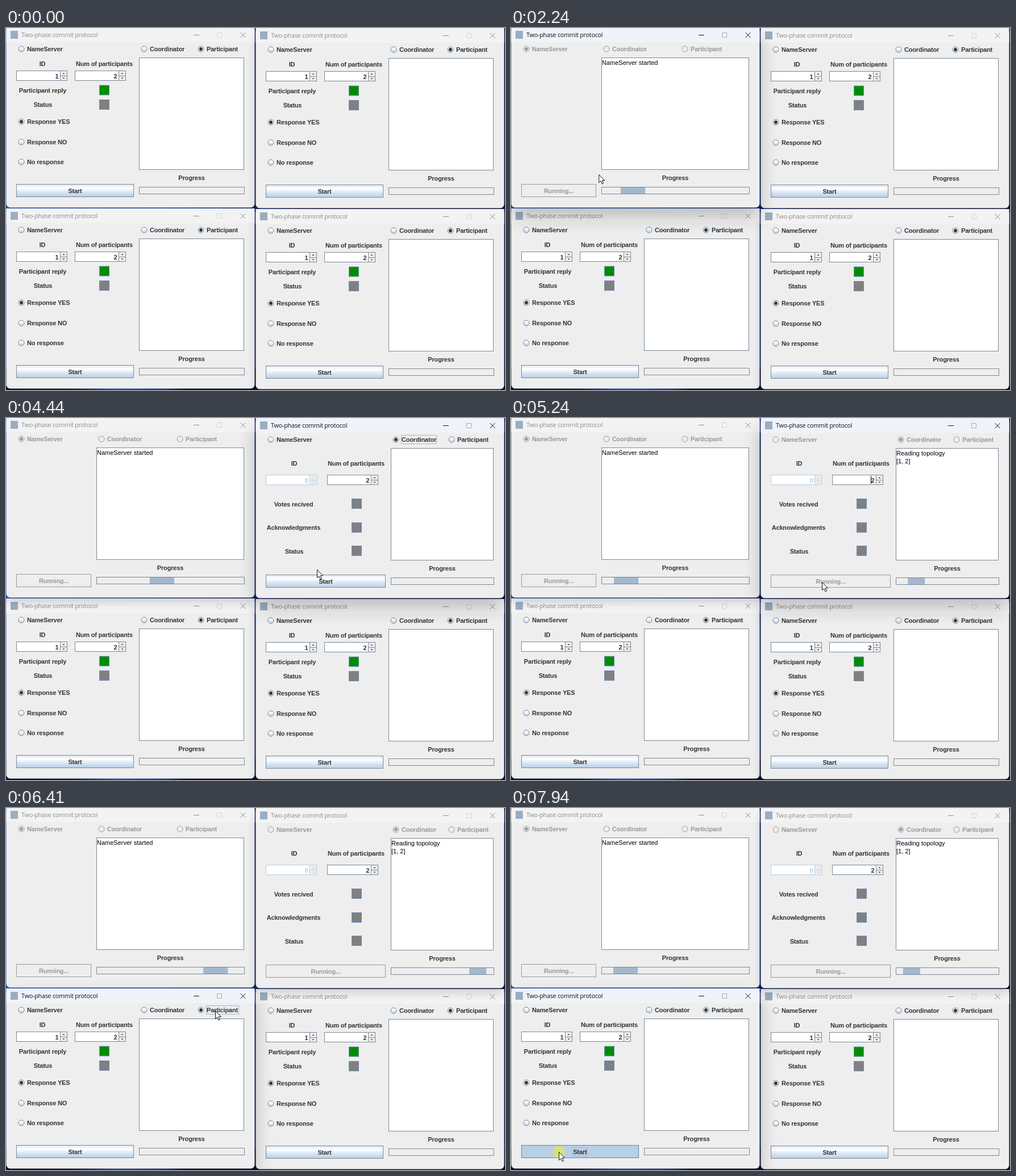
An HTML page for the animation above (8000 ms loop, 878x638 px).

```html
<!DOCTYPE html>
<html lang="en">
<head>
<meta charset="utf-8">
<title>Two-phase commit protocol</title>
<style>
html, body { margin: 0; width: 100%; height: 100%; overflow: hidden; background: #0a1336; }
svg { display: block; width: 878px; height: 638px; }
text { white-space: pre; }
.b { font: bold 11px "Liberation Sans", Arial, sans-serif; letter-spacing: -.17px; }
.p { font: 11px "Liberation Sans", Arial, sans-serif; }
.t { font: 10.8px "Open Sans", "Noto Sans", sans-serif; letter-spacing: -.25px; }
</style>
</head>
<body>
<svg viewBox="0 0 878 638" xmlns="http://www.w3.org/2000/svg">
  <defs>
    <linearGradient id="desk">
      <stop offset="0" stop-color="#1f55b8"/><stop offset=".3" stop-color="#1c3f9c"/>
      <stop offset=".5" stop-color="#10256c"/><stop offset=".62" stop-color="#0a1336"/>
      <stop offset="1" stop-color="#0b1640"/>
    </linearGradient>
    <linearGradient id="floor">
      <stop offset="0" stop-color="#0b1538"/><stop offset=".13" stop-color="#0c1c50"/>
      <stop offset=".22" stop-color="#2458c4"/><stop offset=".32" stop-color="#1a3c94"/>
      <stop offset=".36" stop-color="#0a1336"/><stop offset="1" stop-color="#0a1030"/>
    </linearGradient>
    <linearGradient id="ocean" x2="0" y2="1">
      <stop offset="0" stop-color="#dde8f3"/><stop offset=".3" stop-color="#fff"/>
      <stop offset=".6" stop-color="#dde8f3"/><stop offset="1" stop-color="#b8cfe5"/>
    </linearGradient>
    <filter id="near" x="-20%" y="-20%" width="140%" height="150%"><feGaussianBlur stdDeviation="8"/></filter>
    <filter id="far" x="-20%" y="-20%" width="140%" height="150%"><feGaussianBlur stdDeviation="16"/></filter>
  </defs>
  <rect width="878" height="638" fill="url(#desk)"/>
  <rect y="600" width="878" height="38" fill="url(#floor)"/>
  <g id="windows"></g>
  <rect id="bar1" y="281" height="11" fill="#a3b8cc"/>
  <rect id="bar2" y="282" height="11" fill="#a3b8cc"/>
  <circle id="halo" r="10.5" fill="#d9e36a" fill-opacity=".92"/>
  <path id="arrow" d="M.5 .5V14.6L3.8 11.6L6.1 16.9L8.4 15.9L6.1 10.8H10.4Z" fill="#fff" stroke="#111"/>
</svg>
<script>
const LOOP = 8000;
const INK = '#333', DIM = '#999', EDGE = '#7a8a99', PALE = '#b8cfe5', GREY = '#808080';
const $ = id => document.getElementById(id);
const set = (el, attrs) => { for (const k in attrs) el.setAttribute(k, attrs[k]); };

// Mouse stops: time, x, y
const path = [
  [40, 866, 640], [810, 83, 49], [950, 76, 34], [1200, 76, 34], [1630, 105, 278],
  [2080, 105, 278], [2990, 700, 36], [3580, 700, 36], [4340, 547, 267],
  [4440, 547, 267], [4700, 547, 289], [5250, 547, 289], [6050, 368, 354],
  [6130, 368, 357], [6480, 368, 357], [7720, 84, 606], [8000, 84, 606]
];
// Mouse button: down, up
const clicks = [[960, 1080], [1910, 2000], [3440, 3560], [4920, 5030], [6160, 6280], [7820, 8000]];
const [pickName, startName, pickCoord, startCoord, pickPart, startPart] = clicks;

// Unfolded travel of the first bouncing bar
const travel = [[2010, 0], [3320, 187], [4440, 339], [5240, 453], [6410, 619], [7940, 844], [8000, 853]];

function along(knots, t, ease = p => p) {
  if (t <= knots[0][0]) return knots[0].slice(1);
  const i = knots.findIndex(k => k[0] > t);
  if (i < 0) return knots[knots.length - 1].slice(1);
  const a = knots[i - 1], b = knots[i];
  const p = ease((t - a[0]) / (b[0] - a[0]));
  return a.slice(1).map((v, j) => v + (b[j + 1] - v) * p);
}
const smooth = p => p * p * (3 - 2 * p);
const bounce = (d, range) => range - Math.abs(d % (2 * range) - range);

const box = (x, y, w, h, fill, stroke = EDGE) =>
  `<rect x="${x + .5}" y="${y + .5}" width="${w - 1}" height="${h - 1}" fill="${fill}" stroke="${stroke}"/>`;
const line = (d, stroke) => `<path d="${d}" fill="none" stroke="${stroke}"/>`;
const text = (s, x, y, fill = INK, anchor = 'start', cls = 'b') =>
  `<text class="${cls}" x="${x}" y="${y}" fill="${fill}" text-anchor="${anchor}">${s}</text>`;
const label = (s, x, y) => text(s, x, y + 4, INK, 'middle');
const focusBox = (x, y, w) => box(x, y, w, 16, 'none', '#a3b8cc');
const lamp = (x, y, fill) => box(x, y, 18, 18, fill, '#6f8cb8');

function radio(s, x, y, { on = false, off = false, focus = 0 } = {}) {
  const ink = off ? DIM : INK;
  return `<circle cx="${x}" cy="${y}" r="5" fill="${off ? '#eee' : 'url(#ocean)'}" stroke="${off ? DIM : EDGE}"/>` +
    (on ? `<circle cx="${x}" cy="${y}" r="2.9" fill="${ink}"/>` : '') +
    (focus ? focusBox(x + 9, y - 8, focus) : '') + text(s, x + 10, y + 4, ink);
}

function spinner(value, x, y, off) {
  const edge = off ? PALE : EDGE, ink = off ? PALE : INK, bx = x + 77;
  return box(x, y, 90, 18, '#fff', edge) +
    box(bx, y, 13, 10, '#eee', edge) + box(bx, y + 9, 13, 9, '#eee', edge) +
    `<path d="M${bx + 4.5} ${y + 6}h4l-2 -2zM${bx + 4.5} ${y + 12.5}h4l-2 2z" fill="${ink}"/>` +
    text(value, x + 74.5, y + 14, ink, 'end');
}

function button(w, s) {
  const mid = 18 + w / 2;
  if (s.run) return box(18, 275, w, 23, '#eee', DIM) + text('Running...', mid, 291, DIM, 'middle');
  return box(18, 275, w, 23, s.press ? PALE : 'url(#ocean)', s.hover ? '#6382bf' : EDGE) +
    (s.hover && !s.press ? box(19, 276, w - 2, 21, 'none', PALE) : '') +
    (s.press ? focusBox(mid - 14, 279, 27) : '') + text('Start', mid, 291, INK, 'middle');
}

// Left edge of the log, radio places and button width of each role
const layouts = {
  name: { log: 159, coord: 168, part: 306, button: 132 },
  coord: { log: 238, coord: 247, part: 345, button: 211 },
  part: { log: 234, coord: 243, part: 343, button: 207 }
};

function fields(s) {
  if (s.role === 'name') return '';
  if (s.role === 'coord') return label('ID', 68, 79) + label('Num of participants', 177, 79) +
    spinner(0, 18, 99, true) + spinner(2, 126, 99) +
    (s.caret ? line('M194.5 101V115', '#000') : '') +
    label('Votes recived', 67, 151) + lamp(169, 141, GREY) +
    label('Acknowledgments', 67, 192) + lamp(169, 183, GREY) +
    label('Status', 68, 234) + lamp(169, 224, GREY);
  return label('ID', 64, 63) + label('Num of participants', 173, 63) +
    spinner(1, 18, 75) + spinner(2, 121, 75) +
    label('Participant reply', 64.5, 110) + lamp(164, 100.5, '#008c00') +
    label('Status', 65, 135) + lamp(164, 126, GREY) +
    radio('Response YES', 27, 165, { on: true }) +
    radio('Response NO', 27, 201) + radio('No response', 27, 236);
}

function titleBar(active) {
  const ink = active ? '#111' : '#8c8c8c';
  return `<path d="M.5 25V-1H437.5V25Z" fill="${active ? '#f0f3fa' : '#f3f3f3'}"/>` +
    '<rect x="8" y="5" width="13" height="14" fill="#9aaec2"/>' +
    text('Two-phase commit protocol', 27, 16, ink, 'start', 't') +
    line('M330 12.5H340', ink) + line('M371.5 8.5h8v8h-8z', active ? '#a8a8a8' : '#d4d4d4') +
    line('M412.5 8L421.5 17M421.5 8L412.5 17', ink);
}

function windowAt(s) {
  const l = layouts[s.role];
  const opt = (k, w) => ({ on: s.role === k, off: s.run, focus: s.focus === k ? w : 0 });
  const frame = 'x=".5" y="-1" width="437" height="317.5" rx="7"';
  return `<g transform="translate(${s.x} ${s.y})">` +
    `<rect ${frame} transform="translate(0 ${s.active ? 16 : 8})" filter="url(#${s.active ? 'far' : 'near'})" opacity="${s.active ? .23 : .15}"/>` +
    `<rect ${frame} fill="#eee"/>` + titleBar(s.active) +
    radio('NameServer', 27, 37, opt('name', 66)) +
    radio('Coordinator', l.coord, 37, opt('coord', 63)) +
    radio('Participant', l.part, 37, opt('part', 58)) +
    fields(s) + box(l.log, 52, 419 - l.log, 198, '#fff') +
    s.lines.map((row, i) => text(row, l.log + 1, 64.5 + 14.5 * i, '#000', 'start', 'p')).join('') +
    label('Progress', (l.log + 419) / 2, 263.5) +
    box(l.log, 280, 420 - l.log, 13, '#eee') + button(l.button, s) + '</g>';
}

function scene(t, mx, my) {
  const spots = [[0, 0], [439, 1], [0, 319], [439, 320]];
  const wins = spots.map(([x, y]) => ({ x, y, role: 'part', lines: [] }));
  const [a, b, c] = wins;
  const within = ([from, to]) => t >= from && t < to;

  if (t >= pickName[1]) { a.role = 'name'; a.focus = t < startName[0] ? 'name' : ''; }
  a.run = t >= startName[1];
  a.press = within(startName);
  if (t >= 2060) a.lines = ['NameServer started'];

  if (t >= pickCoord[1]) { b.role = 'coord'; b.focus = t < startCoord[0] ? 'coord' : ''; }
  b.run = t >= startCoord[1];
  b.press = within(startCoord);
  b.caret = b.run && t < pickPart[0] && (t - startCoord[1]) % 1000 < 500;
  if (t >= 5090) b.lines = ['Reading topology', '[1, 2]'];

  c.focus = t >= pickPart[0] && t < startPart[0] ? 'part' : '';
  c.press = within(startPart);

  for (const w of wins) {
    const x = mx - w.x, y = my - w.y;
    w.hover = x >= 18 && x < 18 + layouts[w.role].button && y >= 275 && y < 298;
  }
  const order = wins.slice();
  [pickName, pickCoord, pickPart].forEach((click, i) => {
    if (t < click[0]) return;
    order.forEach(w => w.active = false);
    order.push(order.splice(order.indexOf(wins[i]), 1)[0]);
    wins[i].active = true;
  });
  return order.map(windowAt).join('');
}

let shown = '';
function draw(t) {
  const [x, y] = along(path, t, smooth);
  const markup = scene(t, x, y);
  if (markup !== shown) $('windows').innerHTML = shown = markup;

  set($('bar1'), { x: 160 + bounce(along(travel, t)[0], 216), width: t >= 2010 ? 43.2 : 0 });
  set($('bar2'), { x: 678 + bounce(Math.max(0, t - 5040) * .1, 151), width: t >= 5040 ? 30 : 0 });
  const down = clicks.some(([from, to]) => t >= from && t < to);
  set($('halo'), { cx: x, cy: y, visibility: down ? 'visible' : 'hidden' });
  set($('arrow'), { transform: `translate(${x} ${y})`, visibility: t < 70 ? 'hidden' : 'visible' });
}

const begin = performance.now();
function tick() {
  draw((performance.now() - begin) % LOOP);
  requestAnimationFrame(tick);
}
tick();
</script>
</body>
</html>
```
